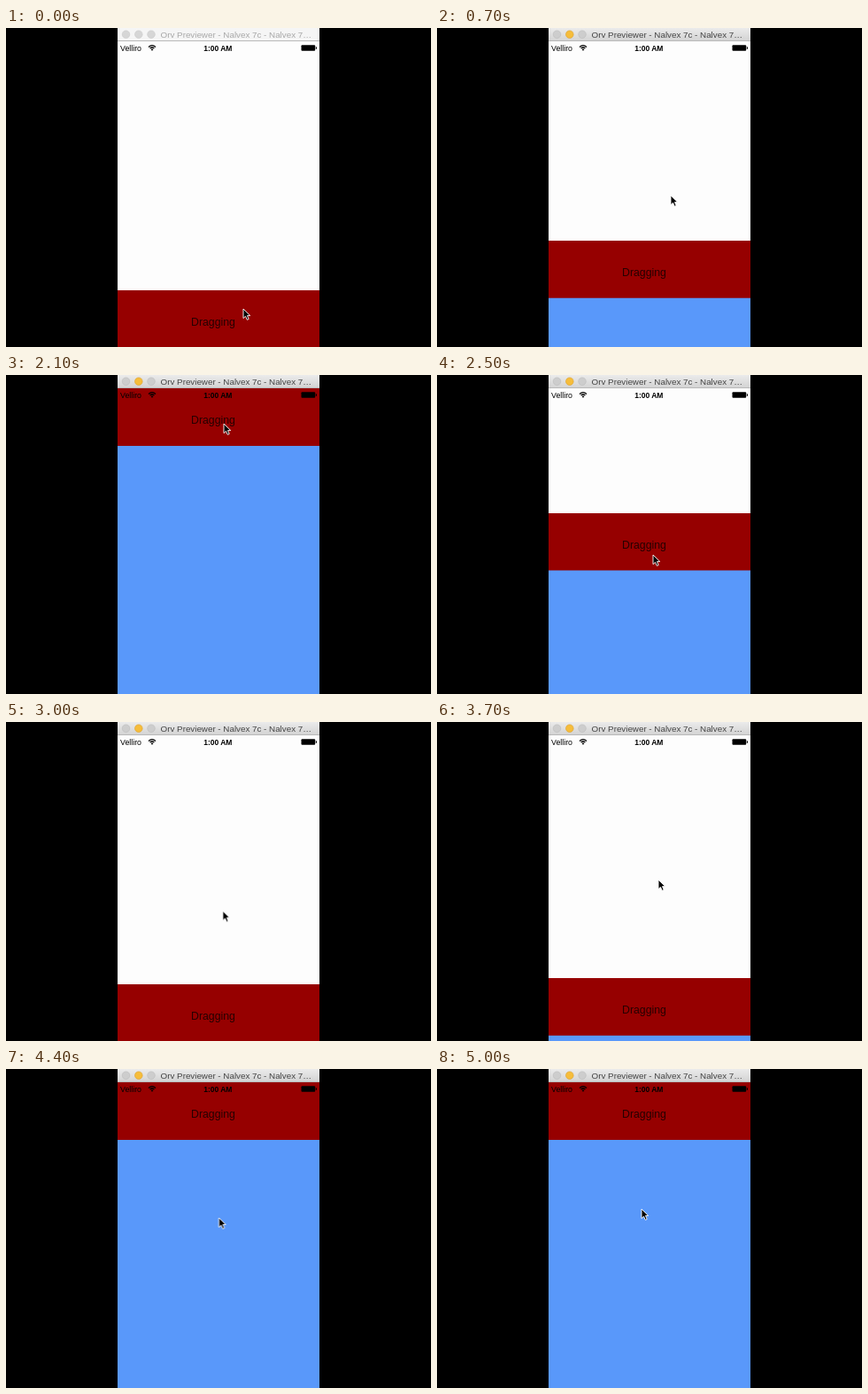
These frames come from a looping animation (480 px wide and 360 px high, 5.1 s). An HTML page:

```html
<!DOCTYPE html>
<html lang="en">
<head>
<meta charset="utf-8">
<title>Sliding panel</title>
<style>
  html, body { margin: 0; width: 100%; height: 100%; overflow: hidden; background: #000; }
  svg { display: block; width: 100%; height: 100%; }
  text { font-family: "Liberation Sans", Arial, sans-serif; }
  .title { font-size: 9.8px; fill: #444; }
  .lights { fill: #cdcdcd; stroke: #bcbcbc; stroke-width: .6; }
  .lights .middle { fill: #f6bd3b; stroke: #dca02c; }
  .inactive .bar { fill: #f5f5f5; }
  .inactive .title { fill: #a8a8a8; }
  .inactive .lights, .inactive .lights .middle { fill: #d6d6d6; stroke: #cacaca; }
  .status { font-size: 8.8px; }
  .time { font-size: 8.5px; font-weight: bold; text-anchor: middle; }
  .label { font-size: 12.3px; fill: #260000; text-anchor: middle; }
</style>
</head>
<body>
<svg viewBox="0 0 480 360">
  <defs>
    <linearGradient id="chrome" x2="0" y2="1">
      <stop stop-color="#ebebeb"/>
      <stop offset="1" stop-color="#d3d3d3"/>
    </linearGradient>
    <clipPath id="screen"><rect x="126" y="15" width="228" height="345"/></clipPath>
  </defs>
  <rect width="480" height="360"/>

  <g clip-path="url(#screen)">
    <rect x="126" y="15" width="228" height="345" fill="#fdfdfd"/>
    <g id="panel">
      <rect x="126" y="64" width="228" height="346" fill="#5998fa"/>
      <rect x="126" width="228" height="65" fill="#960000"/>
      <text class="label" x="234" y="40">Dragging</text>
    </g>
    <g class="status">
      <text x="129" y="25.6">Velliro</text>
      <text class="time" x="239.3" y="25.6">1:00 AM</text>
      <g fill="none" stroke="#000" stroke-width="1.3">
        <path d="M161 21.4Q165 17.8 169 21.4M162.6 23.1Q165 21 167.4 23.1"/>
      </g>
      <path d="M163.6 24.2Q165 23 166.4 24.2L165 25.8Z"/>
      <rect x="333.5" y="19.3" width="15.7" height="6.4" rx="1"/>
      <rect x="349.8" y="21.2" width="1.2" height="2.6" rx=".5"/>
    </g>
  </g>

  <g id="window">
    <rect class="bar" x="126" width="228" height="14.5" fill="url(#chrome)"/>
    <rect x="126" y="14" width="228" height="1" fill="#b9b9b9"/>
    <g class="lights">
      <circle cx="135.5" cy="7.2" r="4.3"/>
      <circle class="middle" cx="149.8" cy="7.2" r="4.3"/>
      <circle cx="164" cy="7.2" r="4.3"/>
    </g>
    <text class="title" x="174.6" y="10.8">Orv Previewer - Nalvex 7c - Nalvex 7…</text>
  </g>

  <path id="cursor" d="M0 0V10.6L2.5 8.3L4.3 12.3L6.2 11.5L4.5 7.6H7.8Z"
        stroke="#fff" stroke-width=".9" stroke-linejoin="round"/>
</svg>
<script>
  const LOOP = 5100, STEP = 100;
  const TOP = 15, BOTTOM = 296;
  const byId = id => document.getElementById(id);

  // Each point is [time, x, y, easing towards the next point].
  function track(id, points) {
    const frames = points.map(([time, x, y, easing = "linear"]) => ({
      offset: time / LOOP, transform: `translate(${x}px, ${y}px)`, easing
    }));
    const motion = byId(id).animate(frames, { duration: LOOP, fill: "both" });
    motion.pause();
    return motion;
  }

  const slide = "ease-in-out";
  const motions = [
    track("panel", [
      [0, 0, BOTTOM], [607, 0, BOTTOM, slide], [907, 0, TOP],
      [2350, 0, TOP, slide], [2650, 0, BOTTOM],
      [3666, 0, BOTTOM, slide], [3966, 0, TOP], [LOOP, 0, TOP]
    ]),
    track("cursor", [
      [0, 268, 317], [400, 268, 317, "ease-in"], [600, 264, 189],
      [1300, 264, 189], [1500, 258, 120, "ease-out"], [1900, 246, 55],
      [2150, 246, 55], [2400, 244, 203],
      [2900, 244, 203, slide], [3400, 254, 330],
      [3500, 254, 330], [3650, 250, 178],
      [4100, 250, 178, slide], [4700, 231, 158], [LOOP, 231, 158]
    ])
  ];

  function draw() {
    const time = Math.floor(performance.now() % LOOP / STEP) * STEP;
    for (const motion of motions) motion.currentTime = time;
    byId("window").classList.toggle("inactive", time < 400);
    requestAnimationFrame(draw);
  }
  draw();
</script>
</body>
</html>
```
